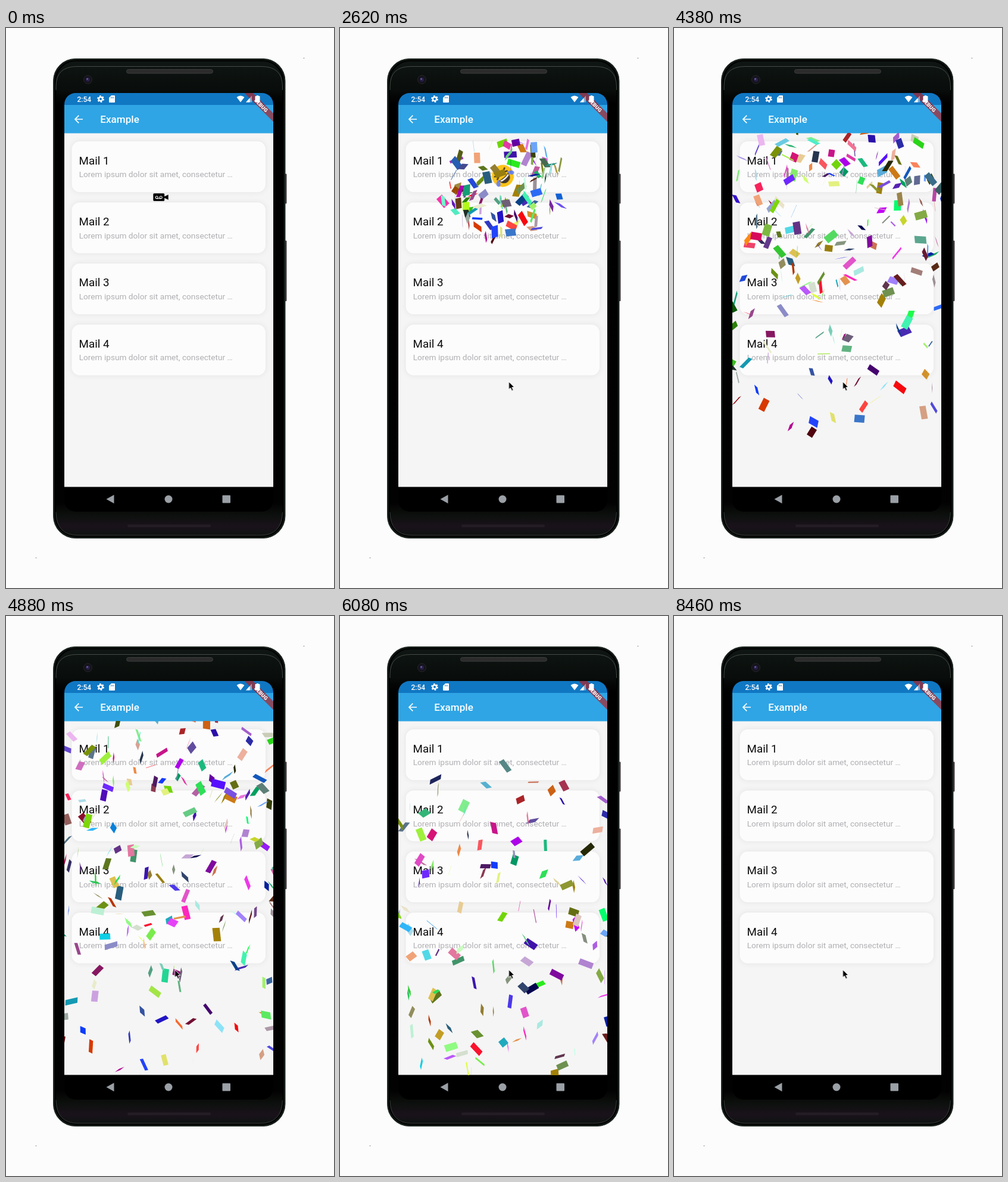
An HTML page with a canvas that plays this animation: 551 px wide and 939 px high, repeating every 9540 ms.

```html
<!DOCTYPE html>
<html lang="en">
<head>
<meta charset="utf-8">
<title>Confetti</title>
<style>
  html, body { margin: 0; width: 100%; height: 100%; overflow: hidden; background: #fcfcfc; }
  svg, canvas { position: absolute; display: block; }
  svg { left: 0; top: 0; }
  canvas { left: 98px; top: 176px; }
  text { font-family: Roboto, "Noto Sans", sans-serif; }
  .card rect { fill: #fcfcfc; filter: drop-shadow(0 0 4px rgba(70, 30, 30, .09)); }
  .name { font-size: 18.8px; fill: #0a0a0a; }
  .note { font-size: 13.66px; fill: #b0b0b4; }

  #recorder, #cursor, #emoji { animation: 9540ms linear infinite; }
  #recorder { animation-name: blink; }
  #cursor { animation-name: point; }
  #emoji { animation-name: pop; }

  @keyframes blink {
    0%, .418% { opacity: 1; }
    .419%, 100% { opacity: 0; }
  }
  @keyframes point {
    0%, .418% { transform: translate(260.5px, 285px); opacity: 0; }
    .419% { transform: translate(260.5px, 285px); opacity: 1; }
    1.8% { transform: translate(260.5px, 285px); animation-timing-function: ease-in-out; }
    3.67% { transform: translate(288px, 177px); }
    6.6% { transform: translate(288px, 177px); animation-timing-function: ease-in; }
    11% { transform: translate(256px, 350px); animation-timing-function: ease-out; }
    16.56% { transform: translate(283px, 592px); }
    17.3%, 100% { transform: translate(283.5px, 593px); opacity: 1; }
  }
  @keyframes pop {
    0%, 19.2% { transform: translate(273.5px, 248px) scale(0); animation-timing-function: cubic-bezier(.3, 1.4, .6, 1); }
    23%, 39.8% { transform: translate(273.5px, 248px) scale(1); animation-timing-function: ease-in; }
    43%, 100% { transform: translate(273.5px, 248px) scale(0); }
  }
</style>
</head>
<body>
<svg width="551" height="939" viewBox="0 0 551 939">
  <defs>
    <linearGradient id="face" x2="0" y2="1">
      <stop offset="0" stop-color="#0f1613"/>
      <stop offset=".06" stop-color="#090d0b"/>
      <stop offset=".09" stop-color="#000"/>
      <stop offset=".93" stop-color="#020202"/>
      <stop offset=".955" stop-color="#0c100d"/>
      <stop offset=".98" stop-color="#1a121b"/>
      <stop offset="1" stop-color="#0d1310"/>
    </linearGradient>
    <clipPath id="screen"><rect x="98" y="109" width="351" height="702" rx="19"/></clipPath>
  </defs>

  <path d="M500 50h1v1h-1zM50 888h1v1h-1z" fill="#333"/>

  <!-- phone body -->
  <rect x="467" y="244.500" width="4.500" height="50" rx="1" fill="#40383c"/>
  <rect x="467" y="356.500" width="4.500" height="101.500" rx="1" fill="#40383c"/>
  <rect x="79.500" y="51.500" width="389.500" height="804" rx="37" fill="#111714" stroke="#2b342e"/>
  <rect x="83" y="55" width="382.500" height="797" rx="34" fill="url(#face)" stroke="#000" stroke-width="2"/>
  <path d="M84 104V98Q84 64.500 119 64.500H429Q464.500 64.500 464.500 98v6" fill="none" stroke="#454c47"/>
  <path d="M84 812Q85 850.500 120 850.500H428Q463 850.500 464.500 812" fill="none" stroke="#353b36"/>
  <rect x="202.500" y="69.500" width="145" height="6.500" rx="3.200" fill="#2b2b2c" stroke="#3c3c3c"/>
  <rect x="204" y="832.500" width="140" height="4.500" rx="2.200" fill="#241d25"/>
  <circle cx="137.500" cy="86.500" r="7" fill="#14131a" stroke="#27252e"/>
  <circle cx="137.500" cy="86.500" r="3.500" fill="#28204a"/>
  <circle cx="136.500" cy="85.500" r="1.200" fill="#7771a5"/>

  <!-- screen -->
  <g clip-path="url(#screen)">
    <path d="M98 109h351v702H98z" fill="#000"/>
    <path d="M98 176h351v593.500H98z" fill="#f5f5f5"/>
    <path d="M98 129h351v47.600H98z" fill="#2fa5e5"/>
    <path d="M98 109h351v20H98z" fill="#1077c3"/>
    <g transform="translate(449 109) rotate(45)">
      <path d="M-36 24h72v10.200h-72z" fill="#b71c1c" fill-opacity=".66"/>
      <text y="32.200" text-anchor="middle" font-size="8.700" font-weight="900" fill="#fff">DEBUG</text>
    </g>
  </g>
  <g fill="#fff">
    <text x="119.500" y="123.500" font-size="12" font-weight="500">2:54</text>
    <g fill="none" stroke="#fff">
      <circle cx="159" cy="119" r="3.200" stroke-width="2.400"/>
      <circle cx="159" cy="119" r="4.900" stroke-width="2" stroke-dasharray="2.600 2.530"/>
    </g>
    <path d="M177 113h5q1 0 1 1v10q0 1-1 1h-8q-1 0-1-1v-7z"/>
    <path d="M176.500 115.500v2.500m2-2.500v2.500m2-2.500v2.500" stroke="#1077c3" stroke-width=".8"/>
    <path d="M387.500 116q6.500-5 13 0l-6.500 8.500z"/>
    <path d="M403 124.500h10v-11z" fill-opacity=".45"/>
    <path d="M403 124.500h6.500v-7z"/>
    <path d="M421 113h3v1h1.500q1 0 1 1v8.500q0 1-1 1h-6q-1 0-1-1V115q0-1 1-1h1.500z"/>
    <text x="158.300" y="159" font-size="17.080" font-weight="500">Example</text>
  </g>
  <path d="M129 153h-13m6.300-6.300l-6.300 6.300l6.300 6.300" fill="none" stroke="#fff" stroke-width="1.700"/>
  <g fill="#9aa0a6">
    <path d="M168.500 790l13-7.200v14.400z"/>
    <circle cx="273" cy="790" r="6.500"/>
    <rect x="363.500" y="783.500" width="13.500" height="13" rx="1"/>
  </g>
  <g id="cards"></g>

  <g id="emoji">
    <circle r="18.500" fill="#fcc319"/>
    <g transform="rotate(-42)">
      <path d="M-10.500 1.500Q0 5 10.500 1.500Q9 13 0 13T-10.500 1.500z" fill="#43372c"/>
      <path d="M-9 3Q0 6 9 3l-.8 2.800Q0 8-8.200 5.800z" fill="#fff"/>
      <path d="M-11-8l7 3.500l-7 3M11-8l-7 3.500l7 3" fill="none" stroke="#43372c" stroke-width="2.400" stroke-linecap="round"/>
      <path d="M-10 0q-8 1-8.500 6q0 4 4 3.500q4.500-1 4.500-9.500zM10 0q8 1 8.500 6q0 4-4 3.500q-4.500-1-4.500-9.500z" fill="#6f86ea"/>
    </g>
  </g>
</svg>

<canvas id="confetti" width="351" height="594"></canvas>

<svg width="551" height="939" viewBox="0 0 551 939">
  <g id="recorder">
    <path d="M249 277h15.500q2 0 2 2v3l6.500-3v9.500l-6.500-3v3q0 2-2 2H249q-2 0-2-2V279q0-2 2-2z" fill="#000" stroke="#fff" stroke-width=".6"/>
    <path d="M253.500 286h6.500" stroke="#fff" stroke-width="1.100"/>
    <g fill="#000" stroke="#fff" stroke-width="1.100">
      <circle cx="253.300" cy="284" r="2"/><circle cx="260.200" cy="284" r="2"/>
    </g>
  </g>
  <path id="cursor" d="M0 0V13.200L3 10.500L5.200 15.400L7.600 14.300L5.500 9.600L9.300 9.300z" fill="#000" stroke="#fff" stroke-width="1"/>
</svg>

<script>
const LOOP = 9540, END = 8440;
const TAU = Math.PI * 2;

document.getElementById('cards').innerHTML = [1, 2, 3, 4].map((n, i) => `
  <g class="card" transform="translate(0 ${i * 102.4})">
    <rect x="110.500" y="190" width="325.500" height="85.300" rx="13.500"/>
    <text class="name" x="122.600" y="228.500">Mail ${n}</text>
    <text class="note" x="122.700" y="250.300">Lorem ipsum dolor sit amet, consectetur …</text>
  </g>`).join('');

let seed = 2024;
function rand(lo = 0, hi = 1) {
  seed = (seed + 0x6d2b79f5) | 0;
  let x = Math.imul(seed ^ (seed >>> 15), 1 | seed);
  x = (x + Math.imul(x ^ (x >>> 7), 61 | x)) ^ x;
  return lo + ((x ^ (x >>> 14)) >>> 0) / 4294967296 * (hi - lo);
}

function makePiece(start) {
  // the square root spreads the pieces evenly over the disc
  const dir = rand(0, TAU), reach = 300 * Math.sqrt(rand(.06, 1));
  return {
    birth: start + rand(0, 80),
    rx: Math.cos(dir) * reach * 1.22,
    ry: Math.sin(dir) * reach,
    w: rand(17, 24),
    h: rand(10, 13),
    angle: [rand(0, TAU), rand(0, TAU), rand(0, TAU)],
    spin: [rand(-4, 4), rand(-4, 4), rand(-2, 2)],
    color: `rgb(${[0, 0, 0].map(() => Math.floor(rand(0, 256)))})`
  };
}

const burst = (start, count) => Array.from({ length: count }, () => makePiece(start));
const pieces = [...burst(2170, 125), ...burst(3400, 135)];

const ctx = document.getElementById('confetti').getContext('2d');

function drawPiece(p, ms) {
  const s = (ms - p.birth) / 1000;
  if (s < 0) return;
  // drag slows the throw while gravity builds up the fall
  const thrown = 1 - Math.exp(-.8 * s);
  const x = 175 + p.rx * thrown;
  const y = 72 + p.ry * thrown + 36 * s + 24 * s * s;
  if (y > 615 || x < -20 || x > 371) return;

  const [a, b, c] = p.angle.map((v, i) => v + p.spin[i] * s);
  const ca = Math.cos(a), sa = Math.sin(a);
  const cb = Math.cos(b), sb = Math.sin(b);
  const cc = Math.cos(c), sc = Math.sin(c);
  ctx.setTransform(cb * cc, sa * sb * cc + ca * sc, -cb * sc, ca * cc - sa * sb * sc, x, y);
  ctx.fillStyle = p.color;
  ctx.fillRect(-p.w / 2, -p.h / 2, p.w, p.h);
}

let origin;
function frame(now) {
  origin ??= now;
  const ms = (now - origin) % LOOP;
  ctx.setTransform(1, 0, 0, 1, 0, 0);
  ctx.clearRect(0, 0, 351, 594);
  if (ms < END) pieces.forEach(p => drawPiece(p, ms));
  requestAnimationFrame(frame);
}
requestAnimationFrame(frame);
</script>
</body>
</html>
```
